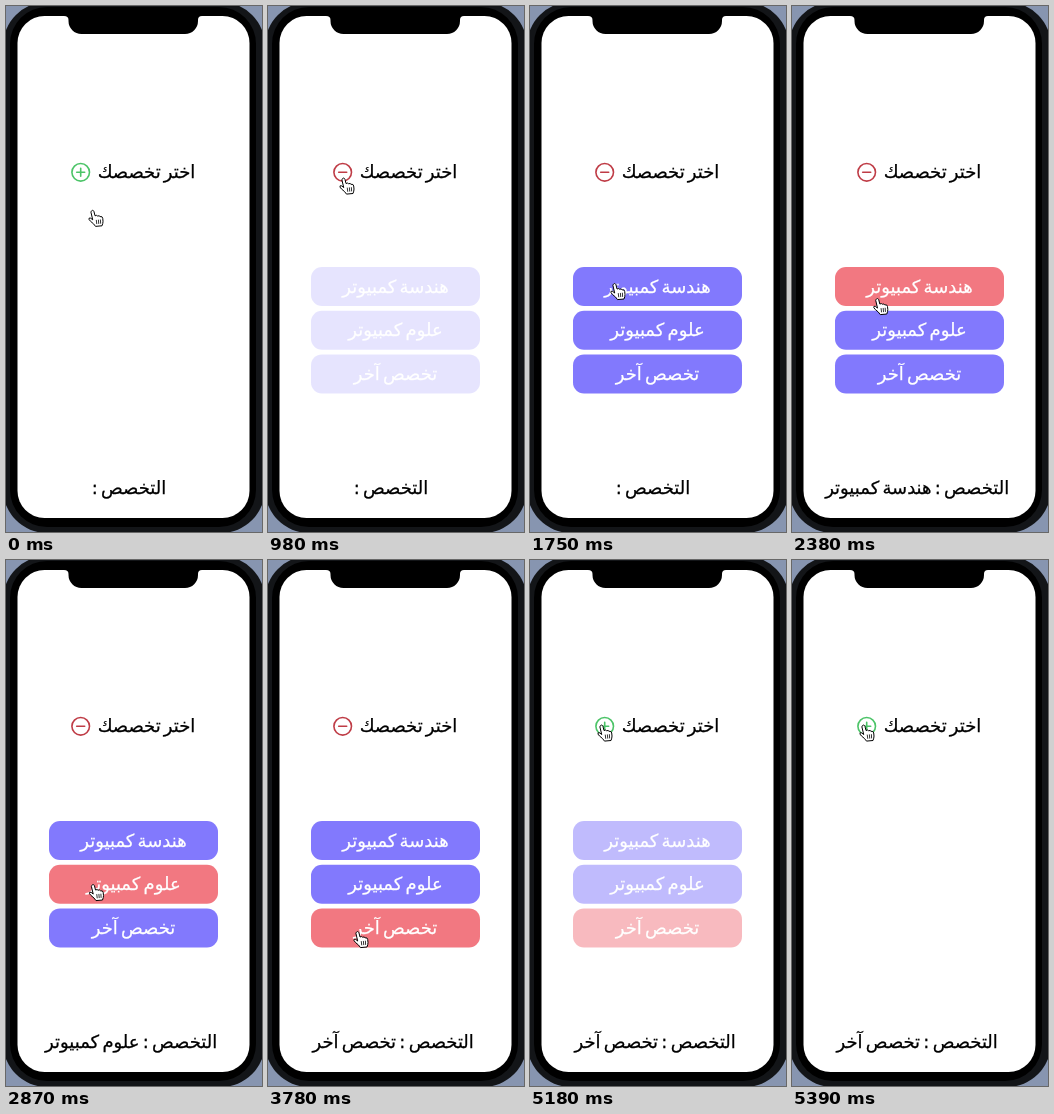
Animation, 256 px wide and 526 px high, one loop 5.53 s. Source, as an HTML page:

```html
<!DOCTYPE html>
<html lang="ar">
<head>
<meta charset="utf-8">
<title>اختر تخصصك</title>
<style>
  html, body { margin: 0; width: 100%; height: 100%; overflow: hidden; background: #8795b0; }
  svg { display: block; width: 100%; height: 100%; }
  text {
    font: 18px "DejaVu Sans", sans-serif; word-spacing: -2.5px;
    direction: rtl; text-anchor: middle;
    fill: currentColor; stroke: currentColor; stroke-width: .25;
  }
  #menu { color: #fff; }
  .icon { fill: none; stroke-width: 1.6; stroke-linecap: round; }
</style>
</head>
<body>
<svg viewBox="0 0 256 526">
  <rect x="-3" y="-4" width="262" height="531" rx="44" fill="#131518"/>
  <rect x="4" y="1" width="246" height="520" rx="37"/>
  <rect x="11.5" y="10" width="232" height="502" rx="27" fill="#fff"/>
  <path d="M58 9V10Q62.5 10 62.5 14V15A13 13 0 0 0 75.5 28H179A13 13 0 0 0 192 15V14Q192 10 196 10V9Z"/>

  <text x="140.5" y="172">اختر تخصصك</text>
  <g id="plus" class="icon" stroke="#4cc468">
    <circle cx="74.7" cy="166.3" r="8.8"/><path d="M70.7 166.3h8M74.7 162.3v8"/>
  </g>
  <g id="minus" class="icon" stroke="#bf3c46">
    <circle cx="74.7" cy="166.3" r="8.8"/><path d="M70.7 166.3h8"/>
  </g>

  <g id="menu"></g>
  <text id="result" y="487.5"></text>

  <g id="hand" fill="#fff" stroke="#000" stroke-linejoin="round" stroke-linecap="round">
    <path d="M3 2C3.5 0 5.5 0 6 2L7 6Q9 5 9.5 6.2Q11.5 5.5 12 6.8Q14.5 6.3 14.7 8.5L15 11.5Q15 13.5 14 16L7.5 16.6Q6 14 2.5 11.5L1 9.6Q.5 7.5 2.7 8.4L4.4 9.8Z"/>
    <path d="M8.3 10.5l.4 3.4M10.4 10.3l.3 3.4M12.4 10.1l.2 3.4" stroke-width=".8"/>
  </g>
</svg>
<script>
const LOOP = 5530, STEP = 70;
const PURPLE = "#8279fd", PINK = "#f27881";
const majors = [
  { name: "هندسة كمبيوتر", pickedAt: 2030 },
  { name: "علوم كمبيوتر", pickedAt: 2870 },
  { name: "تخصص آخر", pickedAt: 3780 }
];

// The pointer goes to the icon, rests on each button before picking it, then returns.
const home = { x: 82, y: 204 };
const stops = [
  { at: 210, x: 85, y: 182 },
  { at: 560, x: 71, y: 171.5 },
  ...majors.map((major, i) => ({ at: major.pickedAt - 280, x: 80 + 2.5 * i, y: 277 + 47 * i })),
  { at: 4410, x: 59, y: 156.5 },
  { at: 4690, x: 67, y: 164.5 }
];

const $ = id => document.getElementById(id);
const progress = (t, from, to) => Math.min(1, Math.max(0, (t - from) / (to - from)));

$("menu").innerHTML = majors.map(({ name }, i) => {
  const y = 261 + i * 43.7;
  return `<rect x="43" y="${y}" width="169" height="39" rx="11"/>
    <text x="127.5" y="${y + 25.7}">${name}</text>`;
}).join("");
const buttons = $("menu").querySelectorAll("rect");

// Longer glides take more time.
function pointerAt(t) {
  let { x, y } = home, from = home;
  for (const stop of stops) {
    const distance = Math.hypot(stop.x - from.x, stop.y - from.y);
    const duration = Math.min(490, 45 * Math.sqrt(distance));
    const k = progress(t, stop.at - duration, stop.at);
    x += (stop.x - from.x) * k;
    y += (stop.y - from.y) * k;
    from = stop;
  }
  return [x, y];
}

function draw(t) {
  const picked = majors.filter(major => t >= major.pickedAt).length - 1;
  buttons.forEach((button, i) => button.setAttribute("fill", i === picked ? PINK : PURPLE));

  const fadeIn = Math.sin(progress(t, 910, 1470) * Math.PI / 2);
  const fadeOut = progress(t, 4970, 5390);
  $("menu").setAttribute("opacity", fadeIn * (1 - fadeOut));

  const open = progress(t, 700, 840) - progress(t, 4830, 4970);
  $("minus").setAttribute("opacity", open);
  $("plus").setAttribute("opacity", 1 - open);

  $("result").textContent = "التخصص :" + (picked < 0 ? "" : " " + majors[picked].name);
  $("result").setAttribute("x", picked < 0 ? 123 : 125.2);
  $("hand").setAttribute("transform", `translate(${pointerAt(t)})`);
}

function tick() {
  draw(Math.floor(performance.now() % LOOP / STEP) * STEP);
  requestAnimationFrame(tick);
}
tick();
</script>
</body>
</html>
```
